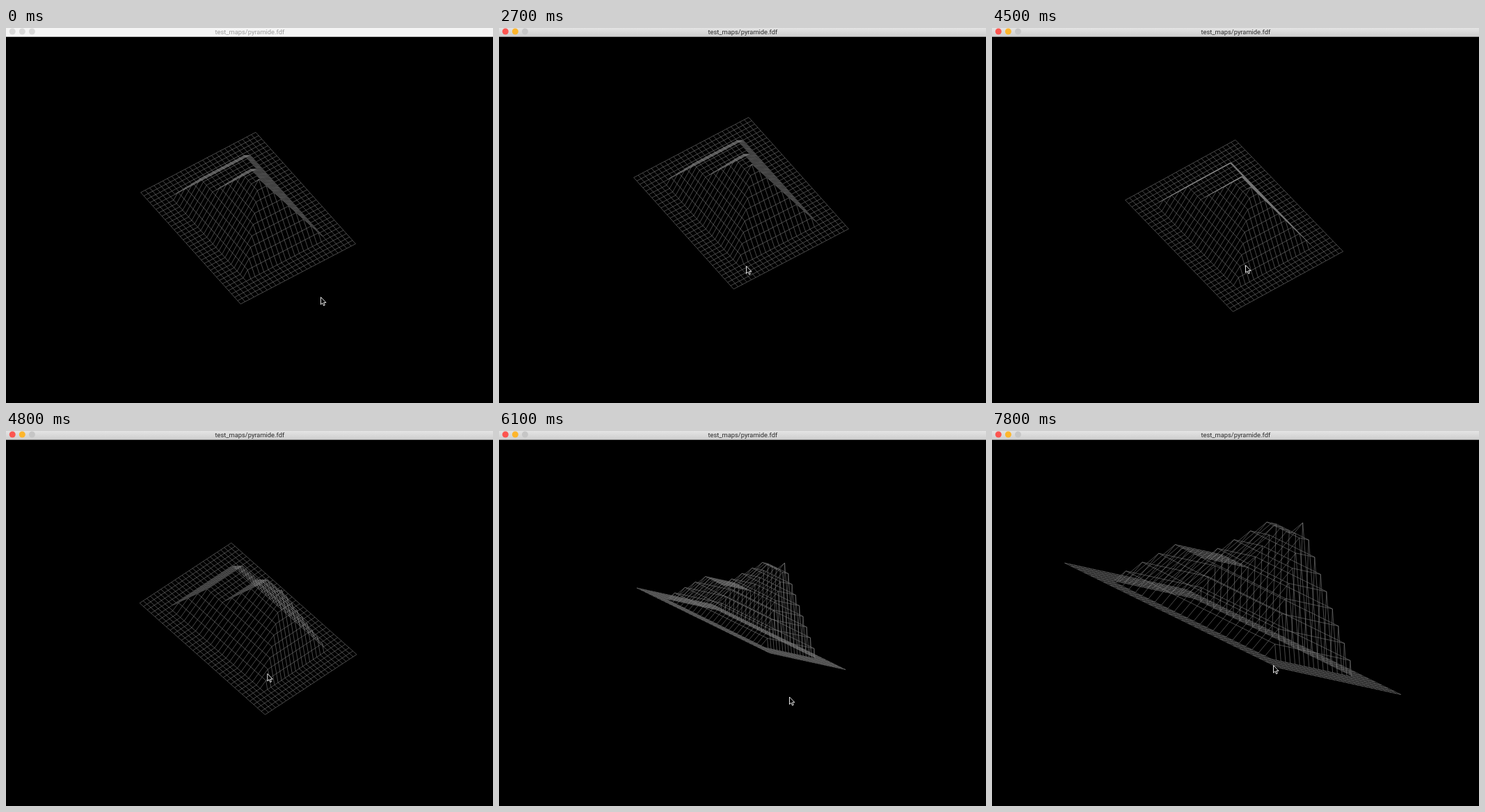
An HTML page that plays this animation: 700 px wide and 540 px high, repeating every 7900 ms.

```html
<!DOCTYPE html>
<html lang="en">
<head>
<meta charset="utf-8">
<title>Wireframe pyramid</title>
<style>
html, body { margin: 0; width: 100%; height: 100%; overflow: hidden; background: #000; }
svg { display: block; width: 700px; height: 540px; }
text { font: 9.35px Roboto, Inter, sans-serif; text-anchor: middle; }
</style>
</head>
<body>
<svg viewBox="0 0 700 540">
  <defs>
    <linearGradient id="bar" x2="0" y2="1">
      <stop stop-color="#e4e4e4"/>
      <stop offset="1" stop-color="#cecece"/>
    </linearGradient>
  </defs>
  <rect width="700" height="540"/>
  <path id="mesh" fill="none" stroke="#808080" stroke-width=".58"/>
  <rect id="top" width="700" height="12.5"/>
  <rect id="rim" y="12" width="700" height=".7"/>
  <g id="dots">
    <circle cx="9.2" cy="5" r="4.5"/>
    <circle cx="23.3" cy="5" r="4.5"/>
    <circle cx="37.4" cy="5" r="4.5"/>
  </g>
  <text id="name" x="350.3" y="8.7">test_maps/pyramide.fdf</text>
  <path id="arrow" d="M.5.6V11.2L2.9 9 4.6 12.8 6.3 12 4.7 8.4H8Z" fill="#000" stroke="#fff" stroke-width=".9"/>
</svg>
<script>
const $ = id => document.getElementById(id);
const LOOP = 7900, STEP = 100;
const COLS = 26, ROWS = 33, CELL = 7.7, RISE = 12.63;
const RAD = Math.PI / 180;

// keys: [time, value, ...] rows, linear in between
const shiftKeys = [[2400, -11], [2700, -32.5], [3200, -32.5], [3500, -11], [3700, -11], [3900, 0]];
const swingKeys = [[4400, 0], [4500, 5], [5000, 29]];
const tiltKeys = [[5000, 0], [5300, 21.2], [5550, 39.3]];
const zoomKeys = [[6900, 1], [7500, 1.61]];
const arrowKeys = [[1200, 452, 387], [1700, 410, 466], [2000, 384, 382], [2400, 358, 346],
  [2800, 354, 341], [3300, 354, 341], [3700, 364, 341], [4500, 364, 341], [5300, 394, 362],
  [6000, 417, 382.4], [6900, 417, 382.4], [7600, 407, 355], [7800, 404, 337]];

function at(keys, t, n = 1) {
  if (t <= keys[0][0]) return keys[0][n];
  for (let i = 1; i < keys.length; i++) {
    const a = keys[i - 1], b = keys[i];
    if (t < b[0]) return a[n] + (b[n] - a[n]) * (t - a[0]) / (b[0] - a[0]);
  }
  return keys[keys.length - 1][n];
}

// Stepped pyramid with a wide terrace above the fourth level
function level(i, j) {
  const k = Math.max(0, Math.min(i - 4, 22 - i, j - 4, 29 - j));
  if (k <= 4) return k;
  return Math.min(k, Math.max(4, j - 8), j === 20 ? 9 : 8);
}

const mix = (a, b, deg) => {
  const c = Math.cos(deg * RAD), s = Math.sin(deg * RAD);
  return a.map((v, n) => v * c + b[n] * s);
};

// Screen rows of the rotation: isometric start, swing about y, then tilt about x
function axes(swing, tilt) {
  const turn = 34.4 * RAD, lean = 40 * RAD;
  const c = Math.cos(turn), s = Math.sin(turn), cl = Math.cos(lean), sl = Math.sin(lean);
  const x = [c, s, 0], y = [-s * cl, c * cl, -sl], z = [-s * sl, c * sl, cl];
  return [mix(x, z, swing), mix(y, mix(z, x, -swing), -tilt)];
}

function meshPath(t) {
  const [x, y] = axes(at(swingKeys, t), at(tiltKeys, t));
  const zoom = at(zoomKeys, t);
  const cx = 351.3 - 3.2 * zoom, cy = 284.8 + at(shiftKeys, t);
  const point = (i, j) => {
    const p = [(i - COLS / 2) * CELL, (j - ROWS / 2) * CELL, level(i, j) * RISE];
    const dot = r => zoom * (r[0] * p[0] + r[1] * p[1] + r[2] * p[2]);
    return (cx + dot(x)).toFixed(1) + ' ' + (cy + dot(y)).toFixed(1);
  };
  const line = (n, f) => 'M' + Array.from({ length: n + 1 }, (_, k) => f(k)).join('L');
  let d = '';
  for (let j = 0; j <= ROWS; j++) d += line(COLS, i => point(i, j));
  for (let i = 0; i <= COLS; i++) d += line(ROWS, j => point(i, j));
  return d;
}

function titleBar(active) {
  $('top').setAttribute('fill', active ? 'url(#bar)' : '#f5f5f5');
  $('rim').setAttribute('fill', active ? '#a9a9a9' : '#d2d2d2');
  $('name').setAttribute('fill', active ? '#2c2c2c' : '#9c9c9c');
  const fills = active ? ['#fc5550', '#fdb62c', '#c6c6c6'] : ['#d9d9d9', '#d9d9d9', '#d9d9d9'];
  [...$('dots').children].forEach((dot, n) => dot.setAttribute('fill', fills[n]));
}

let last = -1;
function draw(now) {
  const t = Math.floor(now % LOOP / STEP) * STEP;
  if (t !== last) {
    last = t;
    titleBar(t >= 400);
    $('mesh').setAttribute('d', meshPath(t));
    $('arrow').setAttribute('transform', `translate(${at(arrowKeys, t, 1)} ${at(arrowKeys, t, 2)})`);
  }
  requestAnimationFrame(draw);
}
draw(performance.now());
</script>
</body>
</html>
```
